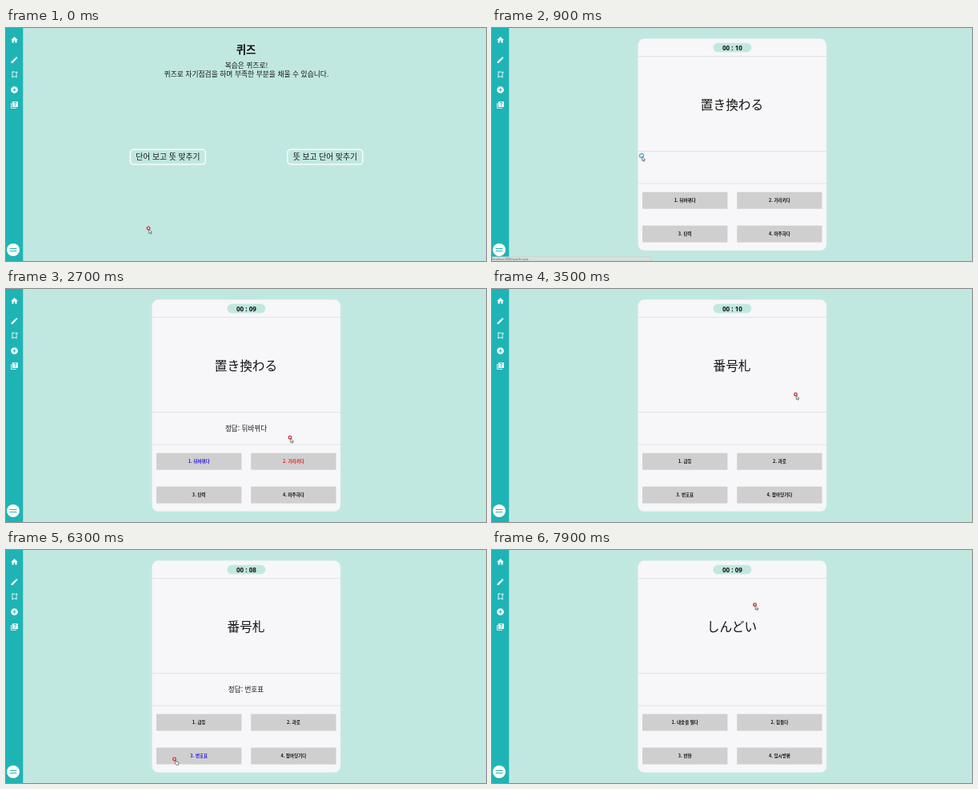
An HTML page for the animation above (8 s loop, 600 by 292 pixels).

```html
<!DOCTYPE html>
<html lang="ko">
<head>
<meta charset="utf-8">
<style>
  html, body { margin: 0; width: 100%; height: 100%; overflow: hidden; background: #c1e8e0; }
  svg { display: block; width: 600px; height: 292px; }
  text { font-family: "Noto Sans CJK KR", "Noto Sans CJK JP", sans-serif; text-anchor: middle; }
  .bold { font-weight: bold; }
  .timer { font-family: "Noto Sans", sans-serif; font-weight: bold; }
  .status { font-family: "Open Sans", sans-serif; text-anchor: start; fill: #555; }
  .line { stroke: #e3e3e5; }
  .outline { fill: none; stroke: #fff; stroke-width: 1.4; }
</style>
</head>
<body>
<svg viewBox="0 0 600 292">
  <rect width="600" height="292" fill="#c1e8e0"/>
  <rect width="21.3" height="292" fill="#1eb4b5"/>
  <g id="icons" fill="#fff" fill-rule="evenodd"></g>
  <circle cx="9" cy="278.6" r="8.2" fill="#0b8586" opacity=".35"/>
  <circle cx="9" cy="278" r="8" fill="#fff"/>
  <path d="M4.6 276.5h8.8M4.6 279.5h8.8" stroke="#1eb4b5" stroke-width="1.2"/>
  <g id="home"></g>
  <g id="quiz"></g>
  <g id="status">
    <rect y="286.8" width="199" height="5.2" fill="#d8dfde" stroke="#bcc8c6" stroke-width=".5"/>
    <text class="status" x="0" y="291" font-size="3.6">localhost:3000/quiz/kr-quiz</text>
  </g>
  <g id="cursor">
    <circle id="ring" fill="#f6dede"/>
    <path id="arrow" d="M.7 1.2v5.2l1.2-1 .9 1.8 1-.5-.9-1.7h1.6z" fill="#fff" stroke="#333" stroke-width=".6"/>
    <path id="hand" d="M1.2 1.5q.8-.5 1.2.4v1.5l2.2.5q1 .3.8 1.3l-.5 2.2H2.3L.4 5l.8-.3z" fill="#fff" stroke="#333" stroke-width=".6"/>
  </g>
</svg>
<script>
const LOOP = 8000, STEP = 100;
const $ = id => document.getElementById(id);

const text = (x, y, size, str, cls = "", fill = "#151515") =>
  `<text x="${x}" y="${y}" dy=".37em" font-size="${size}" class="${cls}" fill="${fill}">${str}</text>`;
const box = (x, y, w, h, attrs) =>
  `<rect x="${x}" y="${y}" width="${w}" height="${h}" ${attrs}/>`;

const icons = [
  [15, "M10 20v-6h4v6h5v-8h3L12 3 2 12h3v8z"],
  [40, "M3 17.3V21h3.8L17.8 9.9l-3.7-3.7zM20.7 7a1 1 0 000-1.4l-2.3-2.3a1 1 0 00-1.4 0l-1.9 1.8 3.8 3.8z"],
  [58.5, "M13 3H5v18l7-3 7 3V11h-2v7l-5-2-5 2V5h6zM17 2h2v3h3v2h-3v3h-2V7h-3V5h3z"],
  [77.5, "M12 2a10 10 0 100 20 10 10 0 000-20zm5 11h-4v4h-2v-4H7v-2h4V7h2v4h4z"],
  [96.5, "M4 6H2v16h16v-2H4zM6 2h16v16H6zM13 14h2v2h-2zM10 7q0-3 4-3t4 3q0 2-3 4v2h-2q-.5-3 3-5 0-2-2-2t-2 1z"]
];
$("icons").innerHTML = icons.map(([y, d]) =>
  `<path transform="translate(5.3 ${y - 5.2}) scale(.433)" d="${d}"/>`).join("");

const homeButton = (x, label) =>
  box(x, 152.3, 94, 18.6, 'rx="4" class="outline"') + text(x + 47, 161.6, 9.8, label);
$("home").innerHTML =
  text(300, 26.8, 13.4, "퀴즈", "bold") +
  text(300.5, 46.5, 8.75, "복습은 퀴즈로!") +
  text(300.5, 57.5, 8.8, "퀴즈로 자기점검을 하며 부족한 부분을 채울 수 있습니다.") +
  homeButton(155.3, "단어 보고 뜻 맞추기") +
  homeButton(351.8, "뜻 보고 단어 맞추기");

const quizzes = [
  { start: 900, answered: 2500, word: "置き換わる", correct: 0, picked: 1,
    options: ["뒤바뀌다", "가리키다", "탄력", "마주하다"] },
  { start: 3500, answered: 5800, word: "番号札", correct: 2, picked: 2,
    options: ["급등", "과로", "번호표", "잡아당기다"] },
  { start: 6800, answered: Infinity, word: "しんどい",
    options: ["내숭을 떨다", "힘들다", "반환", "임시방편"] }
];

function quizMarkup(quiz, t) {
  const done = t >= quiz.answered;
  const left = 10 - Math.floor((Math.min(t, quiz.answered) - quiz.start) / 1000);
  const color = i => !done ? "#111" : i === quiz.correct ? "#2a12e8" : i === quiz.picked ? "#e02020" : "#111";
  return box(182.5, 13.3, 235.6, 265.5, 'rx="8" fill="#f7f6f8"') +
    '<path class="line" d="M182.5 35.5h235.6M182.5 154.5h235.6M182.5 195h235.6"/>' +
    box(276.5, 18.8, 47.8, 11.4, 'rx="5.7" fill="#c1e8e0"') +
    text(300.4, 24.8, 8.1, "00 : " + String(left).padStart(2, "0"), "timer") +
    text(300, 96, 15.7, quiz.word) +
    (done ? text(300, 175, 8.6, "정답: " + quiz.options[quiz.correct]) : "") +
    quiz.options.map((label, i) => {
      const x = 188 + i % 2 * 118.2, y = 205.6 + (i >> 1) * 42;
      return box(x, y, 106.4, 21, 'fill="#cfcfcf"') +
        text(x + 53.2, y + 10.5, 5.5, `${i + 1}. ${label}`, "bold", color(i));
    }).join("");
}

// time, x, y
const path = [
  [0, 178, 251], [100, 178, 251], [600, 187, 160], [1000, 187, 160], [1800, 331, 190],
  [2000, 337.5, 191], [2400, 358, 214], [2500, 358, 214], [2700, 355, 186], [3000, 379.5, 132],
  [4000, 379.5, 132], [4800, 146, 240], [5100, 182, 254], [5600, 210.5, 262], [6300, 210.5, 262],
  [6700, 106, 240], [7100, 270, 84], [7300, 270, 84], [7900, 328.5, 68.5]
];
function cursorAt(t) {
  const next = path.findIndex(p => p[0] > t);
  if (next < 0) return path[path.length - 1].slice(1);
  const [t0, x0, y0] = path[next - 1], [t1, x1, y1] = path[next];
  const k = (t - t0) / (t1 - t0), e = k * k * (3 - 2 * k);
  return [x0 + (x1 - x0) * e, y0 + (y1 - y0) * e];
}

const within = (v, a, b) => v >= a && v < b;
const show = (id, on) => $(id).setAttribute("visibility", on ? "visible" : "hidden");

function draw(t) {
  const quiz = quizzes.findLast(q => t >= q.start);
  show("home", !quiz);
  $("quiz").innerHTML = quiz ? quizMarkup(quiz, t) : "";
  show("status", within(t, 600, 1300));

  const [x, y] = cursorAt(t);
  const overOption = (within(x, 188, 294) || within(x, 306, 412)) && (within(y, 205, 227) || within(y, 247, 269));
  const overHome = within(x, 155, 249) && within(y, 152, 171);
  const hand = quiz ? overOption : overHome;
  const pressed = [800, 2500, 5800].some(c => within(t, c, c + 200));
  $("cursor").setAttribute("transform", `translate(${x} ${y})`);
  const ring = $("ring");
  ring.setAttribute("r", pressed ? 2.6 : 1.8);
  ring.setAttribute("stroke", pressed ? "#35bdd6" : "#d6303a");
  ring.setAttribute("stroke-width", 1.3);
  show("hand", hand);
  show("arrow", !hand);
}

let last = -1;
function tick() {
  const t = Math.floor(performance.now() % LOOP / STEP) * STEP;
  if (t !== last) draw(last = t);
  requestAnimationFrame(tick);
}
tick();
</script>
</body>
</html>
```
